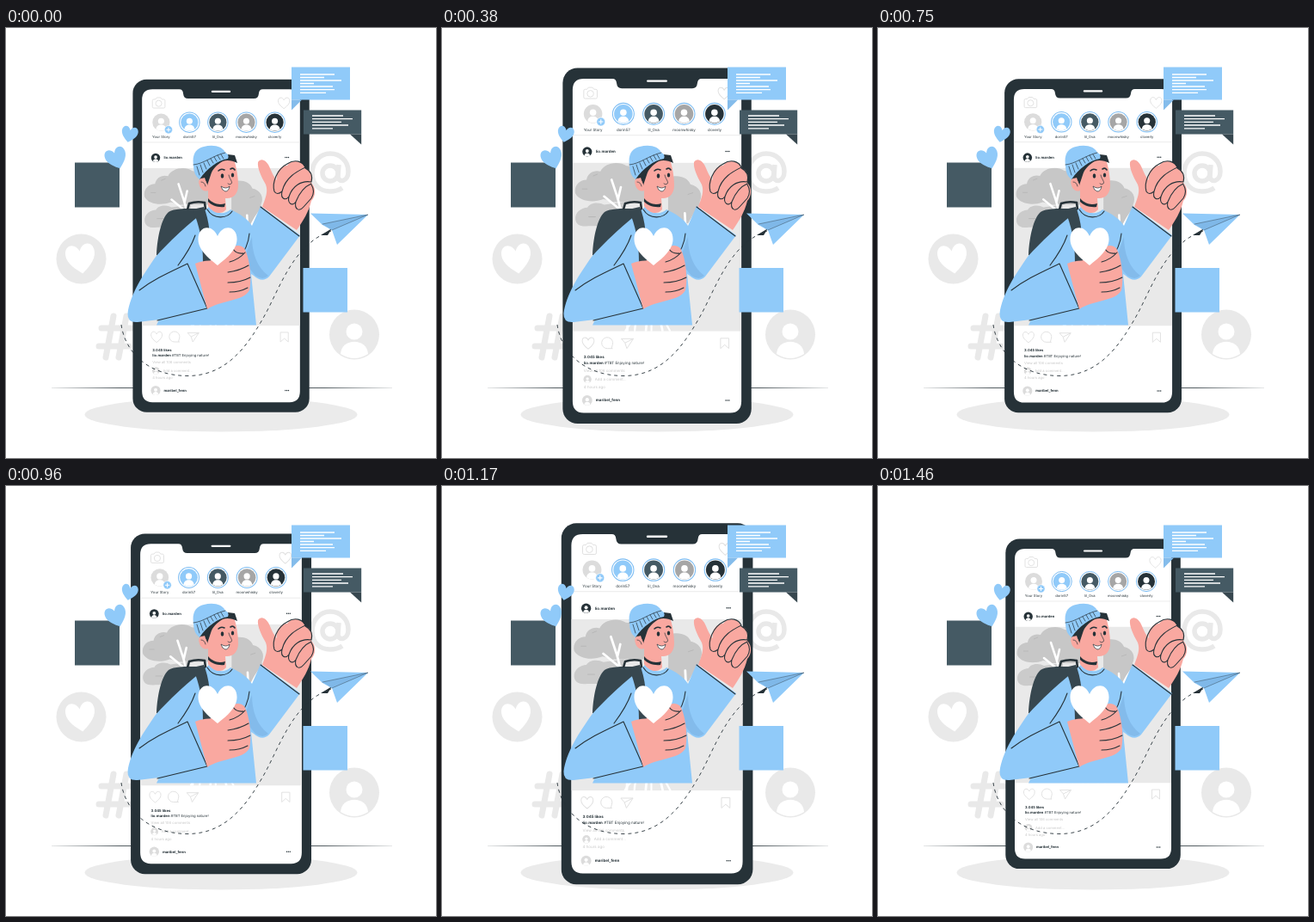
An HTML page that plays this animation: 500 px wide and 500 px high, repeating every 1500 ms.

```html
<!DOCTYPE html>
<html lang="en">
<head>
<meta charset="utf-8">
<title>Social post</title>
<style>
  html, body { margin: 0; width: 100%; height: 100%; overflow: hidden; background: #fff; }
  svg { display: block; width: 100vw; height: 100vh; }
  text { font: 400 4.1px Inter, "Open Sans", sans-serif; fill: #263238; text-rendering: geometricPrecision; }
  .b { font-weight: 700; }
  .dim { fill: #c7c7c7; }
  .mid { text-anchor: middle; }
  .icon { fill: none; stroke: #e0e0e0; stroke-width: .9; stroke-linejoin: round; }
  .ink { fill: none; stroke: #263238; stroke-width: 1.1; stroke-linecap: round; stroke-linejoin: round; }
  .thin { stroke-width: .7; }
  .blue { fill: #90caf9; }
  .dark { fill: #263238; }
  .skin { fill: #f9a8a0; }
  .pale { fill: #e9e9e9; }
  .lines { fill: none; stroke: #fff; stroke-width: 1.3; }
  #phone {
    transform-origin: 250px 253.3px;
    animation: beat 1500ms linear -25ms infinite;
  }
  @keyframes beat {
    0% { transform: scale(1); }
    19% { transform: scale(1.1); }
    56.1%, 59.7% { transform: scale(1); }
    78.7% { transform: scale(1.1); }
    97.7%, 100% { transform: scale(1); }
  }
</style>
</head>
<body>
<svg viewBox="0 0 500 500">
  <defs>
    <path id="heart" d="M0 9.500C-4 6.500-11 2-11-4C-11-11-3-12 0-5.500C3-12 11-11 11-4C11 2 4 6.500 0 9.500Z"/>
    <g id="user">
      <circle r="10"/>
      <g fill="#fff"><circle cy="-1.500" r="3.500"/><path d="M-5.800 8.100C-5.800 1 5.800 1 5.800 8.100Q0 11.500-5.800 8.100Z"/></g>
    </g>
    <g id="story"><circle r="11.600" fill="#fff" stroke="#7dbdf3" stroke-width="1"/><use href="#user"/></g>
    <g id="dots"><circle cx="-1.800" r=".7"/><circle r=".7"/><circle cx="1.800" r=".7"/></g>
    <clipPath id="photo"><path d="M159 163.500H341V345.500H159Z"/></clipPath>
    <linearGradient id="floor">
      <stop offset="0" stop-color="#263238" stop-opacity=".15"/><stop offset=".2" stop-color="#263238"/>
      <stop offset=".8" stop-color="#263238"/><stop offset="1" stop-color="#263238" stop-opacity=".15"/>
    </linearGradient>
  </defs>
  <rect width="500" height="500" fill="#fff"/>

  <!-- backdrop -->
  <ellipse cx="250" cy="449.500" rx="158.500" ry="20" fill="#ebebeb"/>
  <rect x="53" y="418.100" width="396" height=".8" fill="url(#floor)"/>
  <path d="M125 335L116 383M140 335L131 383M111 349H146M108 370H143" fill="none" stroke="#e9e9e9" stroke-width="7" stroke-linecap="round"/>
  <g fill="none" stroke="#e9e9e9" stroke-width="5.500">
    <circle cx="377" cy="169" r="9"/>
    <path d="M387 159L386 172C386 181 398 179 398 167C398 154 388 146 377 146C365 146 356 156 356 169C356 182 365 190 377 190Q385 190 391 186"/>
  </g>
  <circle class="pale" cx="87.500" cy="268.500" r="29"/>
  <use href="#heart" transform="translate(87 269) rotate(-8) scale(1.550 1.750)" fill="#fff"/>
  <circle class="pale" cx="405" cy="356.500" r="29"/>
  <g fill="#fff"><circle cx="405" cy="353" r="9.500"/><path d="M389 379C390 360 420 360 421 379Q405 389 389 379Z"/></g>

  <g id="phone">
    <rect class="dark" x="148.300" y="61.500" width="203.500" height="383.600" rx="16"/>
    <path d="M171 73H202Q206 73 206.500 78Q207 83.500 212 83.500H288Q293 83.500 293.500 78Q294 73 298 73H329Q341 73 341 85V421Q341 433.500 329 433.500H171Q159 433.500 159 421V85Q159 73 171 73Z" fill="#fff"/>
    <path d="M240 75.500H260" stroke="#fff" stroke-width="2.200" stroke-linecap="round"/>

    <g class="icon">
      <path d="M172.500 84.500H174.500L176 82.500H180.500L182 84.500H184Q185.500 84.500 185.500 86V93Q185.500 94.500 184 94.500H172.500Q171 94.500 171 93V86Q171 84.500 172.500 84.500Z"/>
      <circle cx="178.200" cy="89.200" r="3.500"/>
      <use href="#heart" transform="translate(322.500 89) scale(.6 .65)" stroke-width="1.500"/>
      <path d="M159 134H341" stroke-width=".6"/>
    </g>

    <use href="#user" transform="translate(181 111)" fill="#dcdcdc"/>
    <circle cx="189.500" cy="119.500" r="4.600" class="blue" stroke="#fff" stroke-width=".6"/>
    <path d="M187 119.500H192M189.500 117V122" stroke="#fff"/>
    <use href="#story" transform="translate(213.700 111)" fill="#90caf9"/>
    <use href="#story" transform="translate(246.400 111)" fill="#455a64"/>
    <use href="#story" transform="translate(279.200 111)" fill="#a6a6a6"/>
    <use href="#story" transform="translate(312 111)" fill="#263238"/>
    <g class="mid">
      <text x="181" y="129.300">Your Story</text>
      <text x="213.700" y="129.300">dorin57</text>
      <text x="246.400" y="129.300">lil_Ova</text>
      <text x="279.200" y="129.300">moonwhisky</text>
      <text x="312" y="129.300">cloverly</text>
    </g>

    <use href="#user" transform="translate(174.700 151.800) scale(.52)" fill="#263238"/>
    <text class="b" x="184" y="153">lio.marden</text>
    <use href="#dots" x="326" y="151.500" class="dark"/>

    <g clip-path="url(#photo)">
      <path d="M159 163.500H341V345.500H159Z" fill="#e9e9e9"/>
      <path d="M162 197C160 189 166 182 174 182C175 175 182 171 189 173C193 164 208 161 217 167L244 170V206H204C200 207 196 203 192 203C182 207 167 206 162 197Z" fill="#c7c7c7"/>
      <path d="M162 225C161 217 169 212 175 212C178 206 188 206 193 209L215 206V232H176C168 233 163 231 162 225Z" fill="#cbcbcb"/>
      <path d="M262 180C272 176 283 179 286 187C296 189 300 198 296 206C298 216 293 226 283 229L262 232Z" fill="#c7c7c7"/>
      <g fill="none" stroke="#fff" stroke-width="2.500" stroke-linecap="round">
        <path d="M218 345C220 285 216 230 207 200L201 182M208 203L211 190M210 214L193 200M276 260C279 240 285 225 297 211M281 238L280 218"/>
        <path d="M256 345L246 300M238 345L240 325"/>
        <path d="M216 345Q219 339 225 334M226 345Q226 338 229 332M244 345V337M264 345L258 334" stroke-width="2"/>
      </g>
      <path d="M169 192H175M181 178L186 176M176 222H184M283 198L289 196" stroke="#b5b5b5" stroke-width=".8"/>
    </g>

    <g class="icon">
      <use href="#heart" transform="translate(175.800 358.500) scale(.58 .64)" stroke-width="1.500"/>
      <path d="M201 363.500L202 364H196.500A6 6 0 1 1 202 360ZM211.500 353.500H224.500L217.500 364L215.500 358ZM215.500 358L224.500 353.500M318.500 353H327.500V364L323 360L318.500 364Z"/>
    </g>
    <text class="b" x="171" y="374.700">3.045 likes</text>
    <text x="171" y="381.300"><tspan class="b">lio.marden</tspan> #TBT Enjoying nature!</text>
    <text class="dim" x="171" y="389">View all 106 comments</text>
    <use href="#user" transform="translate(175 397.200) scale(.43)" fill="#dcdcdc"/>
    <text class="dim" x="183" y="398.600">Add a comment...</text>
    <text class="dim" x="171" y="406.700">4 hours ago</text>
    <use href="#user" transform="translate(174.700 420) scale(.55)" fill="#dcdcdc"/>
    <text class="b" x="184" y="421.300">maribel_fenn</text>
    <use href="#dots" x="326" y="420" class="dark"/>
  </g>

  <path d="M134 345C138 374 162 404.500 212 404.500C258 404 282 368 302 332C320 298 336 250 378 236" class="ink" stroke-dasharray="4 4" style="stroke-width:.9;stroke-linecap:butt"/>

  <!-- backpack -->
  <path d="M175 264C176 242 181 221 189 214Q192 211 207 210L238 210L232 244L186 270Z" fill="#37474f"/>
  <path d="M211 211L213 204Q222 201 231 203L232 211" fill="none" stroke="#263238" stroke-width="2.600"/>

  <!-- body -->
  <path class="blue" d="M236 208C244 217 255 217 261 211C272 216 281 222 286 230L296 207L342 241L306 289Q298 297 288 288L285 286L291 345.500H175L178 339L153 342Q141 343 141.500 332C144 310 160 286 174 266C190 248 208 232 220 222Z"/>
  <path d="M286 243L276 271L290 288Q299 294 305 288C292 278 286 262 286 243Z" fill="#78afe0" opacity=".55"/>
  <path d="M217 211L230 208C236 222 239 246 238 273L229 273C229 248 225 230 217 211Z" fill="#37474f"/>
  <path class="ink" d="M234 211C242 224 258 221 263 213M220 241C216 253 209 264 200 276M155 305C172 292 188 285 211 274M211 274L234 326L176 340M283 239C282 250 277 261 270 269M296 208L341 242"/>

  <!-- head -->
  <path class="skin" d="M228 170C238 157 250 151 265 152C268 162 270 173 270 183C270 193 264 199 255 198L256 211C249 219 240 214 235 207L235 189C228 192 223 183 225 177Z"/>
  <path class="dark" d="M235 198C241 205 248 206 255 204L254 208C246 209 239 206 235 202ZM225 176C229 163 243 151 258 147L266 148L269 157C263 154 257 153 252 155C245 159 240 164 238 171L234 183L231 174Z"/>
  <path class="skin" d="M234 182C231 171 222 174 225 182C227 189 233 190 234 187Z"/>
  <path class="ink thin" d="M227 179Q231 179 232 184M259 171C260 176 264 179 262 181Q260 183 258 181"/>
  <path class="ink" d="M247 166Q250 163 254 165M261 164Q264 162 266 165" style="stroke-width:1.600"/>
  <path d="M250 184Q256 188 260 184Q259 190 255 190Q251 189 250 184Z" fill="#fff" stroke="#263238" stroke-width=".7"/>
  <ellipse class="dark" cx="251.500" cy="172" rx="1.800" ry="2.700"/>
  <ellipse class="dark" cx="263.500" cy="171" rx="1.700" ry="2.600"/>
  <path class="blue" d="M218 160C216 147 221 140 230 138C240 135 252 137 255 145Q260 147 258 152C246 154 234 163 225 176Q218 171 218 160Z"/>
  <path class="ink thin" d="M218 159C230 158 241 148 255 145M222 161L225 171M226 159L229 168M230 157L233 164M234 154L237 160M238 152L241 157M242 150L245 155M246 148L249 153M250 147L253 152"/>

  <!-- raised thumb -->
  <path class="skin" d="M298 208C302 197 305 190 302 182C297 173 292 163 293 156C297 150 304 155 307 163C310 170 312 174 315 177C313 168 319 160 327 160C332 152 345 154 348 163C355 165 357 172 355 180C361 186 360 196 355 201C352 214 345 225 338 235Z"/>
  <path class="ink" d="M312 190C309 180 315 164 327 158C336 152 345 155 348 162C340 166 325 173 321 190Q315 195 312 190ZM321 190C319 199 325 201 329 196C333 184 343 177 355 179C357 171 354 166 348 163M329 196C327 204 333 208 337 202C341 192 348 184 355 181M337 202C335 211 341 214 346 208L355 198Q360 190 355 182"/>

  <!-- lower hand and heart -->
  <path class="skin" d="M220 274L234 327C250 316 276 318 283 305C286 294 284 268 277 256C270 249 258 255 251 266C244 272 230 269 220 274Z"/>
  <path class="ink" d="M260 272Q271 269 278 261M258 284Q272 282 282 276M258 296Q273 296 284 290M260 307Q272 307 281 302M264 257Q268 263 276 262"/>
  <use href="#heart" transform="translate(246 254.500) scale(2.050 2.260)" fill="#fff"/>

  <!-- floating items -->
  <rect x="80" y="156.500" width="52" height="52" fill="#455a64"/>
  <use href="#heart" class="blue" transform="translate(143.500 124) rotate(12) scale(.86 .95)"/>
  <use href="#heart" class="blue" transform="translate(128.500 152) rotate(-20) scale(1.120 1.270)"/>
  <rect class="blue" x="345.500" y="279" width="51.500" height="51.500"/>

  <path class="blue" d="M332 45.500H400V83.500H332Z"/>
  <path d="M332 83.500H344L332 95.500Z" fill="#84bceb"/>
  <path class="lines" d="M342 54H382M342 57.500H370M342 61H390M342 64.500H358M342 68H380M342 71.700H382M342 75.300H372"/>
  <path d="M346 95.500H413.200V123.500H346Z" fill="#455a64"/>
  <path d="M400 123.500H413.200V135.500Z" fill="#37474f"/>
  <path class="lines" d="M356 102H392M356 105.700H403M356 109.400H390M356 113H398M356 116.800H380"/>

  <path d="M366 241L379 233L374 241Z" class="dark"/>
  <path class="blue" d="M354 215.500L421 217L385 252L379 235L368 229Z"/>
  <path d="M368 228L421 217L379 235Z" fill="#7fb8e8"/>
  <path class="ink" d="M368 228L421 217L379 235" style="stroke-width:.4"/>
</svg>
</body>
</html>
```
